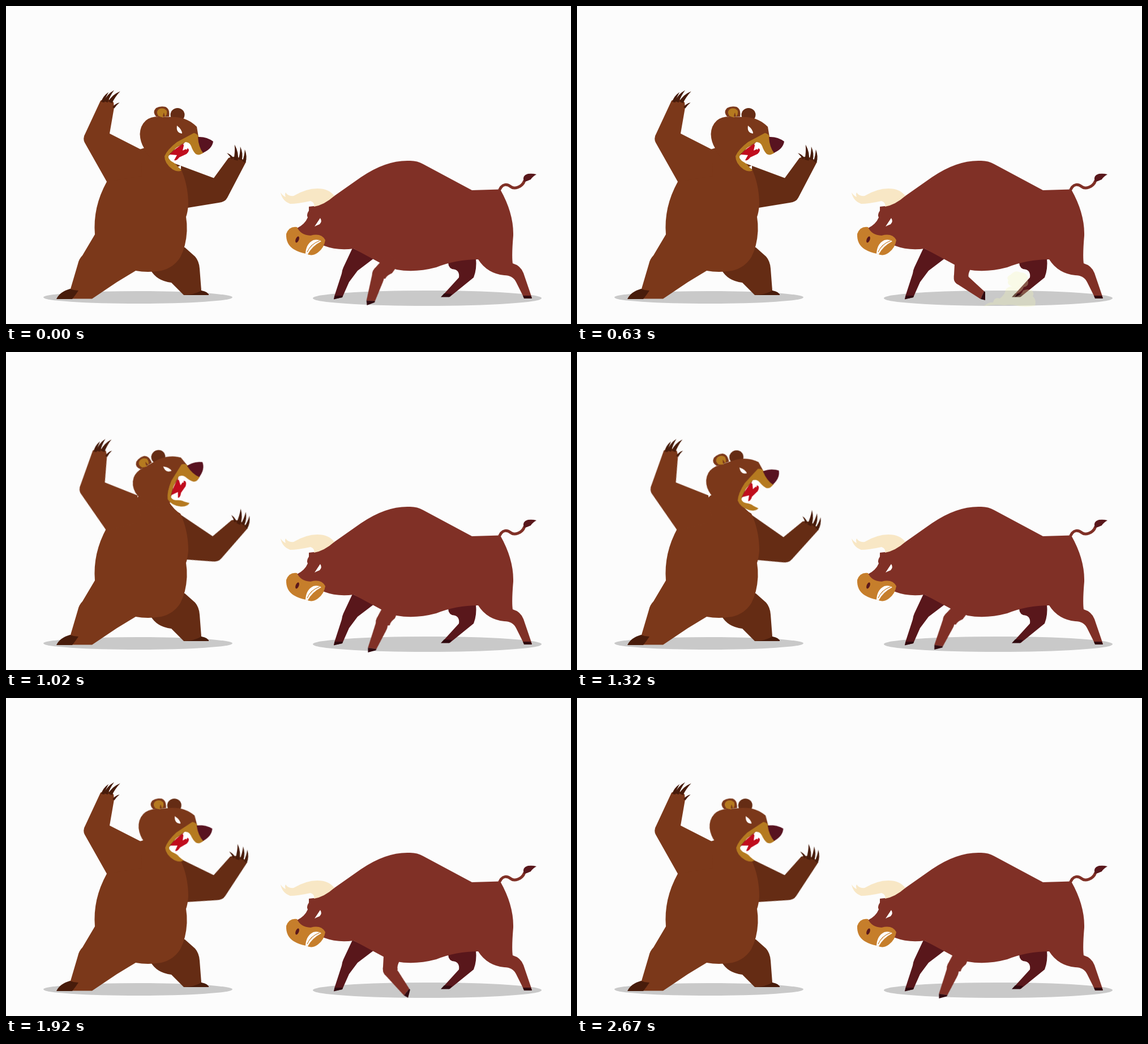
Write an HTML page that moves like this. It is 998 px wide and 561 px high and loops after 2700 ms.

```html
<!DOCTYPE html>
<html lang="en">
<head>
<meta charset="utf-8">
<title>Bear and bull</title>
<style>
html, body { margin: 0; width: 100%; height: 100%; overflow: hidden; background: #fcfcfc; }
svg { display: block; width: 100vw; height: 100vh; }

.bear { fill: #7b381a; }
.bear-far { fill: #652c14; }
.claw { fill: #481c0b; }
.tan { fill: #b57a20; }
.bull { fill: #803026; }
.bull-far { fill: #59171b; }
.hoof { fill: #30090f; }
.orange { fill: #c67e2b; }
.shadow { fill: #c9c9c9; }
.white { fill: #fff; }

/* Joints: every moving part turns about one fixed point */
.joint { animation: 2700ms ease-in-out infinite; }
#head { transform-origin: 273px 252px; animation-name: roar; }
#near-arm { transform-origin: 234px 318px; animation-name: raise; }
#far-arm { transform-origin: 275px 306px; animation-name: reach; }
#thigh { transform-origin: 678px 449px; animation-name: thigh; animation-timing-function: linear; }
#shin { transform-origin: 678px 482px; animation-name: shin; animation-timing-function: linear; }
#dust { transform-origin: 720px 530px; animation-name: dust; animation-timing-function: linear; }

@keyframes roar {
  0%, 25.56% { transform: rotate(0deg); }
  37.78% { transform: rotate(-30deg); animation-timing-function: ease-in; }
  48.89% { transform: rotate(-19.3deg); animation-timing-function: ease-out; }
  59.26%, 100% { transform: rotate(-5.3deg); }
}
@keyframes raise {
  0%, 25.56%, 59.26%, 100% { transform: rotate(0deg); }
  36%, 49.5% { transform: rotate(-5.3deg); }
}
@keyframes reach {
  0%, 25.56% { transform: rotate(0deg); }
  37.78% { transform: rotate(13.5deg); }
  48.89% { transform: rotate(14.5deg); }
  59.26%, 100% { transform: rotate(5.6deg); }
}

/* Stride of 1750 ms, cut off by the loop: forward, scrape, fold, step, reach */
@keyframes thigh {
  0%, 64.81% { transform: rotate(39deg); }
  6.3%, 8.52%, 25.56%, 71.11%, 73.33%, 90.37% { transform: rotate(0deg); }
  34.07%, 37.78%, 98.89%, 100% { transform: rotate(25deg); }
  48.89% { transform: rotate(40deg); }
  61.48% { transform: rotate(48deg); }
}
@keyframes shin {
  0%, 64.81% { transform: rotate(31deg); }
  6.3%, 71.11% { transform: rotate(15deg); }
  8.52%, 25.56%, 73.33%, 90.37% { transform: rotate(0deg); }
  34.07%, 37.78%, 98.89%, 100% { transform: rotate(50deg); }
  48.89%, 61.48% { transform: rotate(36deg); }
}
@keyframes dust {
  0%, 7.04%, 71.85% { opacity: 0; transform: scale(.2); }
  9.26%, 74.07% { opacity: 1; transform: scale(.4); }
  17.78%, 19.7%, 82.6%, 84.52% { opacity: 1; transform: none; }
  24.89%, 89.7%, 100% { opacity: 0; transform: none; }
}
</style>
</head>
<body>
<svg viewBox="0 0 998 561" preserveAspectRatio="none">
  <defs>
    <path id="claw" d="M-3.500 3Q-3 -8 6 -18Q2.500 -7 2.500 3Z"/>
  </defs>

  <ellipse class="shadow" cx="233" cy="514" rx="167" ry="11"/>
  <ellipse class="shadow" cx="744" cy="515.5" rx="202" ry="13.5"/>

  <g id="bear">
    <path class="bear-far" d="M300 420L316 426L334 442Q341 450 342 463L345 502L358 508V510H314L292 488Q266 485 255 465Z"/>
    <path class="claw" d="M314 510Q334 509 345 502Q357 504 358 510Z"/>
    <g id="far-arm" class="joint">
      <path class="bear-far" d="M285 273L367 303.500L393 268Q409 262 424 275L391 338Q387 346 376 347L290 361Z"/>
      <g class="claw">
        <use href="#claw" transform="translate(399 268) rotate(-27) scale(-.65 .65)"/>
        <use href="#claw" transform="translate(406 268) rotate(13) scale(-1.25 1.25)"/>
        <use href="#claw" transform="translate(414 268) rotate(18) scale(-1.05 1.05)"/>
        <use href="#claw" transform="translate(421 272) rotate(21) scale(-1 1)"/>
      </g>
    </g>
    <path class="bear" d="M178 310L236 253L262 245L286 262Q298 280 308 285Q322 315 322 350Q321 364 318 372Q320 384 319.500 397Q318 424 308 443Q296 462 274 467Q250 471 229 467L196 487L152 516.500H90L114 499L127 455Q129 446 135 440L157 403Q153 355 178 310Z"/>
    <path class="claw" d="M89 517Q95 504 113 499Q120 502 128 502Q122 511 117 517Z"/>
    <g id="near-arm" class="joint">
      <path class="bear" d="M178 310L139 241Q135 233 140 225L167 167Q178 160 190 170L191 179L183 225L238 253L240 300Z"/>
      <g class="claw">
        <use href="#claw" transform="translate(172 167) rotate(13) scale(.92)"/>
        <use href="#claw" transform="translate(178 166) rotate(18) scale(1.15)"/>
        <use href="#claw" transform="translate(186 167) rotate(25) scale(1.2)"/>
        <use href="#claw" transform="translate(191 178) rotate(33) scale(.65)"/>
      </g>
    </g>
    <g id="head" class="joint">
      <ellipse class="bear-far" cx="303" cy="192" rx="12.5" ry="12"/>
      <path class="bear" d="M244 251Q237 240 236.500 226Q237 211 247 202Q255 195 270 195L300 196Q322 198 337 213L340 231L300 250L287 270L270 276Q250 268 244 251Z"/>
      <path class="bear" d="M265 195Q258 187 265 180Q272 176 282 178Q290 182 288 195Z"/>
      <path class="tan" d="M269 194Q264 186 270 182Q278 178 284 185Q285 191 281 196L279 188Q276 193 278 197Z"/>
      <path class="white" d="M285 266L318 239L325 247L322 262L304 272L297 281Z"/>
      <path d="M289 262Q300 250 315 242L312 255L321 251Q326 254 319 261L306 267Q301 274 297 272L302 263Z" fill="#c00d1d"/>
      <path class="white" d="M313 244L318 239L324 244L319 254ZM303 284L309 281V288Z"/>
      <path class="tan" d="M332 224Q338 225 341 232L350 258Q341 265 335 261Q330 256 327 247Q324 240 317 240Q301 248 289 261Q283 269 294 275Q300 278 303 283L310 290Q304 294 294 288Q280 278 280 265Q285 253 302 240Z"/>
      <path d="M339 231Q354 230 366 239Q364 252 348 259Q340 249 339 231Z" fill="#581320"/>
      <path class="white" d="M302 211Q300 224 311 225Q311 218 302 211Z"/>
    </g>
  </g>

  <g id="bull">
    <path class="bull-far" d="M612 427L596 461Q594 465 593 472L580 512L579 517L594 514L606 487L621 467L650 445ZM782 449Q779 460 788 464Q802 465 800 479L769 513H784L826 479Q832 464 830 445Z"/>
    <path class="hoof" d="M581 511L579 517.500L594 514L595 511ZM774 507L768 513.500H783L788 508Z"/>
    <path d="M870 329C876 310 887 315 892 319S911 321 916 308" fill="none" stroke="#803026" stroke-width="5"/>
    <path class="bull-far" d="M915 310Q911 299 922 296Q930 295 937 297Q930 301 927 306Q921 309 915 310Z"/>
    <path class="bull" d="M535 354L544 353L580 335L627 302Q672 271 714 273Q727 273 737 279L823 325L873 323.500Q897 366 896 405Q893 440 895 454Q909 458 914 471L929 515H915L901 487Q895 475 880 475Q850 472 834 447Q795 447 760 461Q722 471 690 465L668 457L614 428Q586 432 562 423L515 404L514 392Q528 385 533 373Q530 368 535 361Z"/>
    <path class="hoof" d="M913 511H927L929 516H915Z"/>
    <path class="orange" d="M514 390Q500 388 495 402Q494 420 508 429Q518 435 530 437Q542 443 552 434Q562 426 564 413Q557 400 538 405Q520 404 514 390Z"/>
    <path class="white" d="M529 437Q530 419 543 413Q552 411 557 415Q540 424 533 438Z"/>
    <path d="M532 434Q538 420 554 414" fill="none" stroke="#c67e2b" stroke-width="1.2"/>
    <ellipse cx="514.500" cy="412" rx="2.800" ry="5.800" transform="rotate(22 514.500 412)" fill="#59171b"/>
    <path class="white" d="M545 389L555 374Q559 380 554 385Q549 387 545 389Z"/>
    <path d="M580 335Q562 351 544 354Q546 347 538 344Q515 349 502 349Q488 344 485 329Q489 335 494 337Q492 332 494 329Q498 336 508 335Q530 322 550 322Q570 322 580 335Z" fill="#f8e7c5"/>
    <g id="thigh" class="joint">
      <path class="bull" d="M668 442L667 455L666 474Q664 486 674 490L692 479Q690 474 695 464L694 442Z"/>
      <g id="shin" class="joint">
        <path class="bull" d="M666 478Q664 487 674 492L713 517L719 503L693 479Q686 472 678 472Q668 472 666 478Z"/>
        <path class="hoof" d="M713 517L721 519V504.500L719 503Z"/>
      </g>
    </g>
    <path id="dust" class="joint" fill="#f5f6b6" d="M718 530Q728 521 735 523Q737 513 747 516Q757 508 757 500Q763 494 769 495Q758 491 762 484Q757 478 766 474Q774 465 783 470Q798 471 796 483Q800 494 789 496Q787 503 778 507L773 514Q786 509 788 502Q797 498 804 502Q808 507 805 512Q812 518 809 529Q790 533 774 528Q764 526 755 528Q737 525 718 530Z"/>
  </g>
</svg>
</body>
</html>
```
